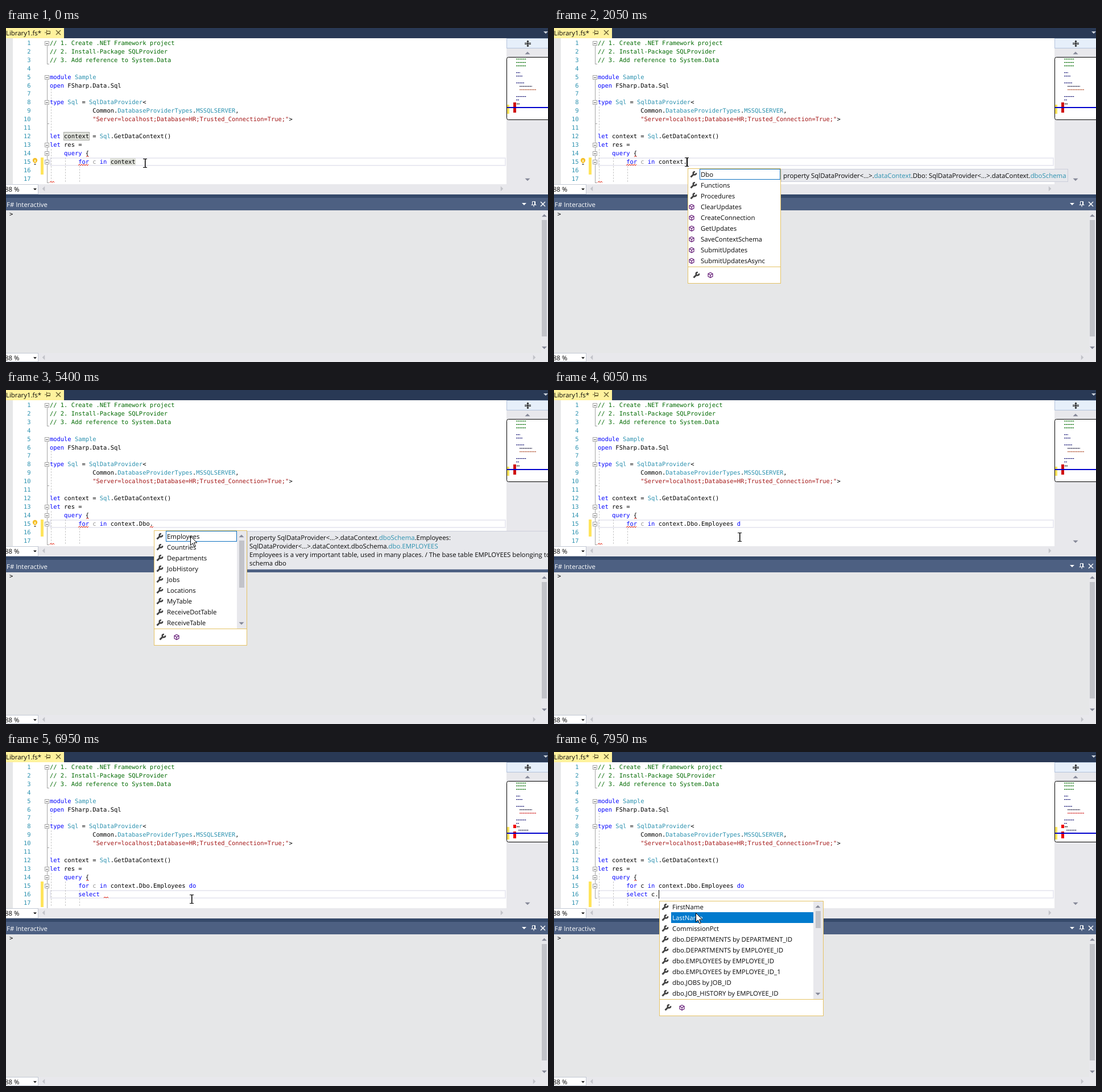
Write an HTML page with a canvas that moves like this. It is 953 px wide and 588 px high and loops after 8 s.

```html
<!DOCTYPE html>
<html lang="en">
<head>
<meta charset="utf-8">
<title>Editor completion</title>
<style>
  html, body { margin: 0; width: 100%; height: 100%; overflow: hidden; }
  canvas { display: block; }
</style>
</head>
<body>
<canvas id="stage" width="953" height="588"></canvas>
<script>
const ctx = document.getElementById('stage').getContext('2d');
const LOOP = 8000;
const MONO = '10.43px "DejaVu Sans Mono", monospace';
const UI = '11.4px "Open Sans", "Noto Sans", sans-serif';
const BLACK = '#000', INK = '#080808', BLUE = '#0000ff', TEAL = '#2b91af', GREEN = '#006a00',
      BROWN = '#a31515', RED = '#e51400', PANEL = '#e6e7e8', TRACK = '#e8e8ec', GRAY = '#868999',
      GOLD = '#e5c365', YELLOW = '#ffe45c', NAVY = '#293955', TITLE = '#4d6082';
const CODE_X = 77;

// Code lines as [colour, text, colour, text, ...]
const CODE = {
  1: [GREEN, '// 1. Create .NET Framework project'],
  2: [GREEN, '// 2. Install-Package SQLProvider'],
  3: [GREEN, '// 3. Add reference to System.Data'],
  5: [BLUE, 'module ', TEAL, 'Sample'],
  6: [BLUE, 'open ', BLACK, 'FSharp.Data.Sql'],
  8: [BLUE, 'type ', TEAL, 'Sql', BLACK, ' = ', TEAL, 'SqlDataProvider', BLACK, '<'],
  9: [BLACK, '            Common.', TEAL, 'DatabaseProviderTypes', BLACK, '.', TEAL, 'MSSQLSERVER', BLACK, ','],
  10: [BROWN, '            "Server=localhost;Database=HR;Trusted_Connection=True;"', BLACK, '>'],
  12: [BLUE, 'let ', BLACK, 'context = ', TEAL, 'Sql', BLACK, '.GetDataContext()'],
  13: [BLUE, 'let ', BLACK, 'res ='],
  14: [BLUE, '    query ', BLACK, '{']
};

const CONTEXT_LIST = { x: 235, y: 247, w: 164, methodsFrom: 3, items: ['Dbo', 'Functions', 'Procedures',
  'ClearUpdates', 'CreateConnection', 'GetUpdates', 'SaveContextSchema', 'SubmitUpdates', 'SubmitUpdatesAsync'] };
const TABLE_LIST = { x: 260, y: 247, w: 164, thumb: 83, items: ['Employees', 'Countries', 'Departments',
  'JobHistory', 'Jobs', 'Locations', 'MyTable', 'ReceiveDotTable', 'ReceiveTable'] };
const COLUMN_LIST = { x: 185, y: 262, w: 289, thumb: 30, items: ['FirstName', 'LastName', 'CommissionPct',
  'dbo.DEPARTMENTS by DEPARTMENT_ID', 'dbo.DEPARTMENTS by EMPLOYEE_ID', 'dbo.EMPLOYEES by EMPLOYEE_ID',
  'dbo.EMPLOYEES by EMPLOYEE_ID_1', 'dbo.JOBS by JOB_ID', 'dbo.JOB_HISTORY by EMPLOYEE_ID'] };

const CONTEXT_TIP = { x: 399, w: 505, h: 23, lines: [
  [INK, 'property SqlDataProvider<...>.', TEAL, 'dataContext', INK, '.Dbo: SqlDataProvider<...>.dataContext.', TEAL, 'dboSchema']] };
const TABLE_TIP = { x: 424, w: 540, h: 68, lines: [
  [INK, 'property SqlDataProvider<...>.dataContext.', TEAL, 'dboSchema', INK, '.Employees:'],
  [INK, 'SqlDataProvider<...>.dataContext.dboSchema.', TEAL, 'dbo.EMPLOYEES'],
  [INK, 'Employees is a very important table, used in many places. / The base table EMPLOYEES belonging to'],
  [INK, 'schema dbo']] };

// Each step changes part of the state from its time on
const STEPS = [
  [0, { tail: '', select: '', row: 15, words: true, bulb: true, forError: true, picked: -1 }],
  [1600, { tail: '.', words: false, bulb: false }],
  [1750, { list: CONTEXT_LIST }],
  [1950, { tip: CONTEXT_TIP }],
  [2000, { bulb: true }],
  [2050, { caret: true }],
  [3550, { tail: '.Dbo', list: null, tip: null, bulb: false, caret: false }],
  [3650, { tail: '.Dbo.' }],
  [3700, { list: TABLE_LIST }],
  [3800, { tip: TABLE_TIP }],
  [3850, { bulb: true, dotError: true }],
  [5400, { arrow: true }],
  [5500, { tail: '.Dbo.Employees', list: null, tip: null, bulb: false, dotError: false, arrow: false }],
  [5850, { tail: '.Dbo.Employees ' }],
  [6000, { tail: '.Dbo.Employees d' }],
  [6100, { tail: '.Dbo.Employees do' }],
  [6400, { caret: true }],
  [6450, { row: 16, caret: false }],
  ...[...'select'].map((c, i) => [6500 + i * 50, { select: 'select'.slice(0, i + 1) }]),
  [6700, { forError: false, grown: true }],
  [6950, { select: 'select ', missing: true }],
  [7050, { select: 'select c', missing: false, used: true }],
  [7150, { select: 'select c.' }],
  [7300, { list: COLUMN_LIST }],
  [7400, { arrow: true }],
  [7850, { picked: 1 }],
  [7950, { caret: true }]
];
const MOUSE = [[0, 244, 238], [1500, 244, 238], [1600, 233, 236], [5350, 233, 236], [5400, 324, 257],
  [5500, 326, 259], [7350, 326, 259], [7900, 249, 283], [LOOP, 249, 283]];

const rowY = n => Math.round(25.8 + 14.95 * (n - 1));

function rect(x, y, w, h, color) {
  ctx.fillStyle = color;
  ctx.fillRect(x, y, w, h);
}
function frame(x, y, w, h, color) {
  ctx.strokeStyle = color;
  ctx.lineWidth = 1;
  ctx.strokeRect(x + .5, y + .5, w - 1, h - 1);
}
function line(color, width, ...points) {
  ctx.strokeStyle = color;
  ctx.lineWidth = width;
  ctx.beginPath();
  for (let i = 0; i < points.length; i += 2) ctx.lineTo(points[i], points[i + 1]);
  ctx.stroke();
}
function triangle(x, y, angle, color, size = 4.5) {
  ctx.save();
  ctx.translate(x, y);
  ctx.rotate(angle * Math.PI / 2);
  ctx.fillStyle = color;
  ctx.beginPath();
  ctx.moveTo(-size, -size / 2);
  ctx.lineTo(size, -size / 2);
  ctx.lineTo(0, size / 2);
  ctx.fill();
  ctx.restore();
}
// Draws coloured runs and returns the end position
function text(runs, x, baseline, font) {
  ctx.font = font;
  for (let i = 0; i < runs.length; i += 2) {
    ctx.fillStyle = runs[i];
    ctx.fillText(runs[i + 1], x, baseline);
    x += ctx.measureText(runs[i + 1]).width;
  }
  return x;
}
function dashes(x, top, bottom) {
  for (let y = top; y < bottom; y += 5) rect(x, y, 1, 3, '#c8c8c8');
}
function squiggle(x, y, w) {
  const points = [];
  for (let i = 0; i <= w; i += 2) points.push(x + i, y + (i % 4 ? -1 : 1));
  line(RED, 1, ...points);
}
function cross(x, y, r, color) {
  line(color, 1.5, x - r, y - r, x + r, y + r);
  line(color, 1.5, x - r, y + r, x + r, y - r);
}
function pin(x, y, angle, color) {
  ctx.save();
  ctx.translate(x, y);
  ctx.rotate(angle);
  line(color, 1, -2.5, 1, -2.5, -4.5, 2.5, -4.5, 2.5, 1);
  line(color, 1, 1.5, -4, 1.5, 1);
  line(color, 1, -4.5, 1.5, 4.5, 1.5);
  line(color, 1, 0, 1.5, 0, 5);
  ctx.restore();
}
function wrench(x, y) {
  line('#424242', 3, x - 4.5, y + 4.5, x + 1, y - 1);
  ctx.lineWidth = 2.6;
  ctx.beginPath();
  ctx.arc(x + 2.4, y - 2.2, 2.6, -.2, 4.9);
  ctx.stroke();
}
function cube(x, y) {
  line('#68217a', 1.2, x, y - 4.5, x + 4, y - 2.3, x + 4, y + 2.3, x, y + 4.5, x - 4, y + 2.3, x - 4, y - 2.3, x, y - 4.5);
  line('#68217a', 1.2, x - 4, y - 2.3, x, y, x + 4, y - 2.3);
  line('#68217a', 1.2, x, y, x, y + 4.5);
}
function zoomBar(y, h, right) {
  rect(0, y, 953, h, TRACK);
  rect(0, y, 57, h, '#fff');
  frame(-1, y, 58, h, '#c2c8d4');
  text([INK, '88 %'], -2, y + 13, UI);
  triangle(51, y + 9, 0, INK, 3);
  triangle(66, y + 8, 1, '#c2c3c9');
  triangle(right, y + 8, -1, '#c2c3c9');
}

function drawMinimap(s) {
  const pitch = s.grown ? 5.94 : 6.08, bottom = s.grown ? 159 : 162;
  const at = n => 53.5 + (n - 1) * pitch;
  ctx.fillStyle = '#fff';
  ctx.strokeStyle = BLACK;
  ctx.lineWidth = 1;
  ctx.beginPath();
  ctx.roundRect(880.5, 51.5, 80, bottom - 52, 3);
  ctx.fill();
  ctx.stroke();
  const strip = (n, x, w, color) => {
    for (let i = 0; i < w; i += 3) rect(x + i, Math.round(at(n)), Math.min(2.3, w - i), 1.2, color);
  };
  [18, 17, 17].forEach((w, i) => strip(i + 1, 897, w, GREEN));
  [[5, 7], [6, 11], [8, 14], [12, 18], [13, 5]].forEach(([n, w]) => strip(n, 897, w, '#1c1c78'));
  strip(9, 903, 22, '#202040');
  strip(10, 903, 29, s.grown ? '#d02020' : '#b05030');
  strip(14, 898, 5, BLACK);
  if (s.grown) {
    strip(15, 901, 18, '#202040');
    rect(881, 132, 4, 22, YELLOW);
    rect(892, 128, 5, 6, '#f00000');
    rect(892, 140, 5, 12, '#f00000');
    rect(881, 142, 72, 2, '#0000cd');
  } else {
    rect(881, 135, 4, 16, YELLOW);
    rect(892, 131, 5, 18, '#d01010');
    rect(881, 139, 72, 2, '#0000cd');
  }
}

function drawWindow() {
  rect(0, 0, 953, 588, PANEL);
  rect(0, 0, 953, 18, NAVY);
  rect(0, 0, 102, 18, '#fff29d');
  text([INK, 'Library1.fs*'], 0, 13, UI);
  pin(73, 8, Math.PI / 2, '#6b5f33');
  cross(92, 8, 4, '#6b5f33');
  triangle(949, 8, 0, '#ced4dd', 4);

  rect(12, 18, 868, 257, '#fff');
  rect(880, 18, 73, 257, TRACK);
  rect(880, 19, 73, 17, '#e6effa');
  frame(880, 18, 75, 18, '#b4c4dc');
  line(INK, 1, 912, 26.5, 923, 26.5);
  line(INK, 1, 912, 28.5, 923, 28.5);
  line(INK, 1, 917.5, 22, 917.5, 33);
  triangle(917.5, 23, 2, INK, 2.5);
  triangle(917.5, 32, 0, INK, 2.5);
  triangle(917, 44, 2, GRAY);
  triangle(917, 267, 0, GRAY);
  zoomBar(275, 18, 872);

  rect(0, 293, 953, 6, '#35496a');
  rect(0, 299, 953, 22, TITLE);
  text(['#fff', 'F# Interactive'], 1, 315, UI);
  triangle(911, 310, 0, '#fff', 4);
  pin(928, 310, 0, '#fff');
  cross(944, 310, 4, '#fff');
  text([BLACK, '>'], 6, 331, MONO);
  rect(941, 321, 12, 251, TRACK);
  rect(942, 338, 9, 205, '#c2c3c9');
  triangle(946.5, 330, 2, GRAY);
  triangle(946.5, 563, 0, GRAY);
  zoomBar(572, 16, 929);
}

function drawCode(s) {
  ctx.save();
  ctx.beginPath();
  ctx.rect(0, 18, 880, 257);
  ctx.clip();
  ctx.font = MONO;
  const advance = ctx.measureText('0').width, col = n => CODE_X + n * advance;

  ctx.strokeStyle = '#eaeaf2';
  ctx.lineWidth = 2;
  ctx.strokeRect(78, rowY(s.row) - 6, 800, 13);
  rect(61, 228, 5, s.row > 15 ? 45 : 30, YELLOW);

  [[79, 107, 123], [79, 138, 182], [79, 213, 270], [104, 228, 273], [129, 243, 273]].forEach(d => dashes(...d));
  const foldEnd = !s.grown ? 272 : s.used ? 257 : 275;
  rect(72, 30, 1, 34, '#a5a5a5');
  rect(72, 90, 1, foldEnd - 90, '#a5a5a5');
  [63, 168, foldEnd].forEach(y => rect(72, y, 4, 1, '#a5a5a5'));
  for (const n of [1, 5, 8, 13, 14, 15]) {
    const y = rowY(n) - 3;
    rect(68, y, 8, 8, '#fff');
    frame(68, y, 8, 8, '#a5a5a5');
    rect(70, y + 4, 4, 1, '#555');
  }

  if (s.words) {
    rect(101, 183, 46, 15, '#dfe1da');
    frame(101, 183, 46, 15, '#a8aaa4');
    rect(183, 229, 45, 13, '#dfe1da');
  }
  ctx.textAlign = 'right';
  for (let n = 1; n <= 17; n++) {
    ctx.fillStyle = TEAL;
    ctx.fillText(n, 43.5, rowY(n) + 4);
  }
  ctx.textAlign = 'left';
  for (const n in CODE) text(CODE[n], CODE_X, rowY(n) + 4, MONO);

  const [, path, end = ''] = s.tail.match(/^(\S*)( .*)?$/);
  let caretX = text([BLUE, 'for ', s.used ? BLACK : '#929292', 'c ', BLUE, 'in ', BLACK, 'context' + path, BLUE, end],
    col(8), 239, MONO);
  if (s.row > 15) caretX = text([BLUE, s.select.slice(0, 6), BLACK, s.select.slice(6)], col(8), rowY(16) + 4, MONO);

  squiggle(141, 226, 5);
  if (s.forError) {
    squiggle(127, 241, 18);
    squiggle(77, 271, 8);
  }
  if (s.dotError) squiggle(253, 241, 6);
  if (s.missing) squiggle(172, 256, 8);
  if (s.caret) rect(Math.round(caretX), rowY(s.row) - 7, 1, 15, BLACK);

  if (s.bulb) {
    ctx.fillStyle = '#f5c02c';
    ctx.beginPath();
    ctx.arc(51, 233, 4.2, 0, 7);
    ctx.fill();
    rect(49.5, 235, 3, 3, '#f5c02c');
    rect(49.5, 239, 3, 2, '#707070');
    rect(50, 232, 2, 4, '#fff2c0');
  }
  ctx.restore();
}

function drawList(list, picked) {
  const { x, y, w, items, thumb, methodsFrom = 99 } = list;
  const inner = w - (thumb ? 18 : 1);
  rect(x, y, w, 203, '#fff');
  if (thumb) {
    rect(x + inner, y + 1, 17, 172, TRACK);
    rect(x + inner + 4, y + 18, 9, thumb, '#c2c3c9');
    triangle(x + inner + 8, y + 10, 2, GRAY);
    triangle(x + inner + 8, y + 164, 0, GRAY);
  }
  if (picked < 0) frame(x + 21, y + 1, inner - 21, 19, '#0e70c0');
  else rect(x + 21, y + 1 + picked * 19, inner - 21, 19, '#007acd');
  items.forEach((item, i) => {
    const mid = y + 11 + i * 19;
    if (i < methodsFrom) wrench(x + 10, mid);
    else cube(x + 7, mid);
    text([i === picked ? '#fff' : INK, item], x + 23, mid + 4, UI);
  });
  rect(x, y + 173, w, 1, GOLD);
  frame(x, y, w, 203, GOLD);
  wrench(x + 15, y + 188);
  cube(x + 40, y + 188);
}

function drawTip({ x, w, h, lines }) {
  rect(x, 248, w, h, '#e7e8ec');
  frame(x, 248, w, h, '#cccedb');
  lines.forEach((runs, i) => text(runs, x + 4, 264 + i * 15, UI));
}

function drawMouse(t, arrow) {
  const i = MOUSE.findIndex(m => m[0] > t);
  const [t0, x0, y0] = MOUSE[i - 1], [t1, x1, y1] = MOUSE[i];
  const k = (t - t0) / (t1 - t0);
  const x = Math.round(x0 + (x1 - x0) * k), y = Math.round(y0 + (y1 - y0) * k);
  if (arrow) {
    const p = new Path2D(`M${x + .5} ${y + .5}v16l3.7-3.6 2.6 6 2.4-1-2.6-6h5.2z`);
    ctx.fillStyle = '#fff';
    ctx.fill(p);
    ctx.strokeStyle = BLACK;
    ctx.lineWidth = 1;
    ctx.stroke(p);
  } else {
    rect(x, y - 7, 1.5, 15, BLACK);
    rect(x - 3, y - 8, 7, 1, BLACK);
    rect(x - 3, y + 7, 7, 1, BLACK);
  }
}

function draw(now) {
  const t = Math.floor(now % LOOP / 50) * 50;
  const s = Object.assign({}, ...STEPS.filter(step => step[0] <= t).map(step => step[1]));
  ctx.textRendering = 'geometricPrecision';
  drawWindow();
  drawMinimap(s);
  drawCode(s);
  if (s.tip) drawTip(s.tip);
  if (s.list) drawList(s.list, s.picked);
  drawMouse(t, s.arrow);
}

const start = performance.now();
function tick() {
  draw(performance.now() - start);
  requestAnimationFrame(tick);
}
tick();
</script>
</body>
</html>
```
